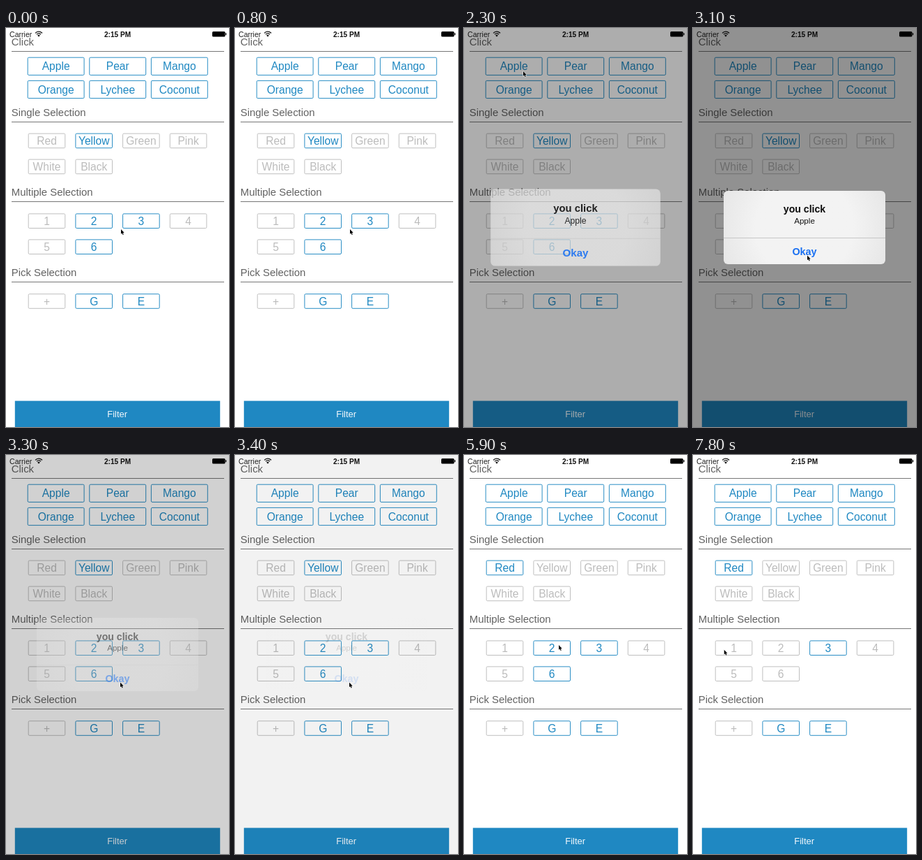
These frames come from a looping animation (320 px wide and 571 px high, 8 s). An HTML page with a canvas:

```html
<!DOCTYPE html>
<html lang="en">
<head>
<meta charset="utf-8">
<title>Tag buttons</title>
<style>
html, body { margin: 0; width: 100%; height: 100%; overflow: hidden; background: #fff; }
canvas { display: block; width: 320px; height: 571px; }
</style>
</head>
<body>
<canvas id="stage" width="320" height="571"></canvas>
<script>
const ctx = document.getElementById('stage').getContext('2d');
const LOOP = 8000, STEP = 100;
const BLUE = '#1f88c2', GREY = '#bcbcbc';
const FONT = '"Liberation Sans", Arial, sans-serif';
const DIM = 0.43;

// Cursor stops: time, x, y
const PATH = [
  [0, 165, 288], [900, 165, 288], [1700, 102.5, 90.5], [2000, 85, 62], [2400, 85, 62],
  [3000, 164, 325.5], [4100, 164, 325.5], [4800, 58, 161], [5500, 58, 161],
  [5900, 136, 272], [6300, 136, 272], [6700, 137, 313], [7200, 137, 313],
  [7800, 44.7, 278.7], [8000, 44.7, 278.7]
];

function text(str, x, y, size, color, align = 'center', weight = '') {
  ctx.font = `${weight} ${size}px ${FONT}`;
  ctx.textAlign = align;
  ctx.fillStyle = color;
  ctx.fillText(str, x, y);
}

function box(label, x, y, w, h, on) {
  ctx.strokeStyle = on ? BLUE : GREY;
  ctx.lineWidth = 0.95;
  ctx.beginPath();
  ctx.roundRect(x, y, w, h, 1.5);
  ctx.stroke();
  text(label, x + w / 2, y + h / 2 + 5.6, 15.6, on ? BLUE : GREY);
}

function section(title, y) {
  text(title, 7.8, y + 4.9, 14.9, '#626262', 'left');
  ctx.fillStyle = '#777';
  ctx.fillRect(8, Math.floor(y + 13), 305, 1);
}

function tags(labels, top, isOn) {
  labels.forEach((label, i) =>
    box(label, 32.2 + 67.7 * (i % 4), top + 37 * Math.floor(i / 4), 52.6, 20.6, isOn(label)));
}

function statusBar() {
  text('Carrier', 5, 12.6, 10.6, '#222', 'left');
  text('2:15 PM', 160, 12.6, 10.1, '#111', 'center', 'bold');
  ctx.strokeStyle = ctx.fillStyle = '#111';
  ctx.lineWidth = 1.3;
  for (const r of [4.2, 6.8]) {
    ctx.beginPath();
    ctx.arc(47, 12, r, -Math.PI * 0.76, -Math.PI * 0.24);
    ctx.stroke();
  }
  ctx.beginPath();
  ctx.moveTo(47, 12.6);
  ctx.arc(47, 12.6, 2.6, -Math.PI * 0.76, -Math.PI * 0.24);
  ctx.fill();
  ctx.fillStyle = '#000';
  ctx.beginPath();
  ctx.roundRect(296, 5, 18.5, 7.5, 1.5);
  ctx.fill();
  ctx.fillRect(315, 7.2, 1.2, 3);
}

function page(t) {
  ctx.fillStyle = '#fff';
  ctx.fillRect(0, 0, 320, 571);
  section('Click', 20);
  section('Single Selection', 121);
  section('Multiple Selection', 235.5);
  section('Pick Selection', 350.5);
  statusBar();

  ['Apple', 'Pear', 'Mango', 'Orange', 'Lychee', 'Coconut'].forEach((label, i) =>
    box(label, 31.2 + 88.6 * (i % 3), i < 3 ? 42.2 : 75.4, 80.9, 25.2, true));

  const single = t < 5000 ? 'Yellow' : 'Red';
  tags(['Red', 'Yellow', 'Green', 'Pink', 'White', 'Black'], 151.1, l => l === single);

  const chosen = { 2: t < 6100, 3: true, 6: t < 7100 };
  tags(['1', '2', '3', '4', '5', '6'], 265.9, l => chosen[l]);
  tags(['+', 'G', 'E'], 380.7, l => l !== '+');

  ctx.fillStyle = BLUE;
  ctx.fillRect(12.8, 533.6, 294.4, 37.4);
  text('Filter', 159.7, 557.3, 13, '#f2f8fc');
}

function alertBox(t) {
  if (t < 2150 || t > 3900) return;
  const leaving = t > 3230;
  const shown = leaving ? Math.exp(-(t - 3230) / 80) : 1 - Math.exp(-(t - 2150) / 108);
  ctx.fillStyle = `rgba(0,0,0,${DIM * shown})`;
  ctx.fillRect(0, 0, 320, 571);

  ctx.save();
  const scale = leaving ? 1 : 1.2 - 0.2 * shown;
  ctx.translate(160, 285.5);
  ctx.scale(scale, scale);
  ctx.globalAlpha = shown ** 1.5;
  const glow = ctx.createRadialGradient(0, 0, 70, 0, 0, 128);
  glow.addColorStop(0, '#f3f3f3');
  glow.addColorStop(1, '#e6e6e6');
  ctx.fillStyle = glow;
  ctx.beginPath();
  ctx.roundRect(-116, -52.5, 232, 105, 6);
  ctx.fill();
  ctx.fillStyle = '#c6c6c6';
  ctx.fillRect(-116, 14.5, 232, 1);
  ctx.globalAlpha = Math.min(1, shown * 1.2);
  text('you click', 0, -21, 14.1, '#0c0c0c', 'center', 'bold');
  text('Apple', 0, -5.7, 11.6, '#161616');
  text('Okay', 0, 39.5, 14.4, '#1a70f2', 'center', 'bold');
  ctx.restore();
}

function cursor(t) {
  const i = Math.max(1, PATH.findIndex(p => p[0] > t));
  const [t0, x0, y0] = PATH[i - 1], [t1, x1, y1] = PATH[i];
  const u = (t - t0) / (t1 - t0);
  const k = u * u * (3 - 2 * u);
  ctx.save();
  ctx.translate(x0 + (x1 - x0) * k, y0 + (y1 - y0) * k);
  ctx.scale(0.9, 0.9);
  ctx.beginPath();
  for (const [x, y] of [[0, 0], [0, 7.6], [1.7, 6.1], [2.9, 9], [4.2, 8.4], [3, 5.7], [5.2, 5.6]])
    ctx.lineTo(x, y);
  ctx.closePath();
  ctx.lineJoin = 'round';
  ctx.lineWidth = 1.2;
  ctx.strokeStyle = 'rgba(255,255,255,.85)';
  ctx.stroke();
  ctx.fillStyle = '#000';
  ctx.fill();
  ctx.restore();
}

function frame() {
  const t = Math.floor((performance.now() % LOOP) / STEP) * STEP;
  page(t);
  alertBox(t);
  cursor(t);
  requestAnimationFrame(frame);
}
frame();
</script>
</body>
</html>
```
